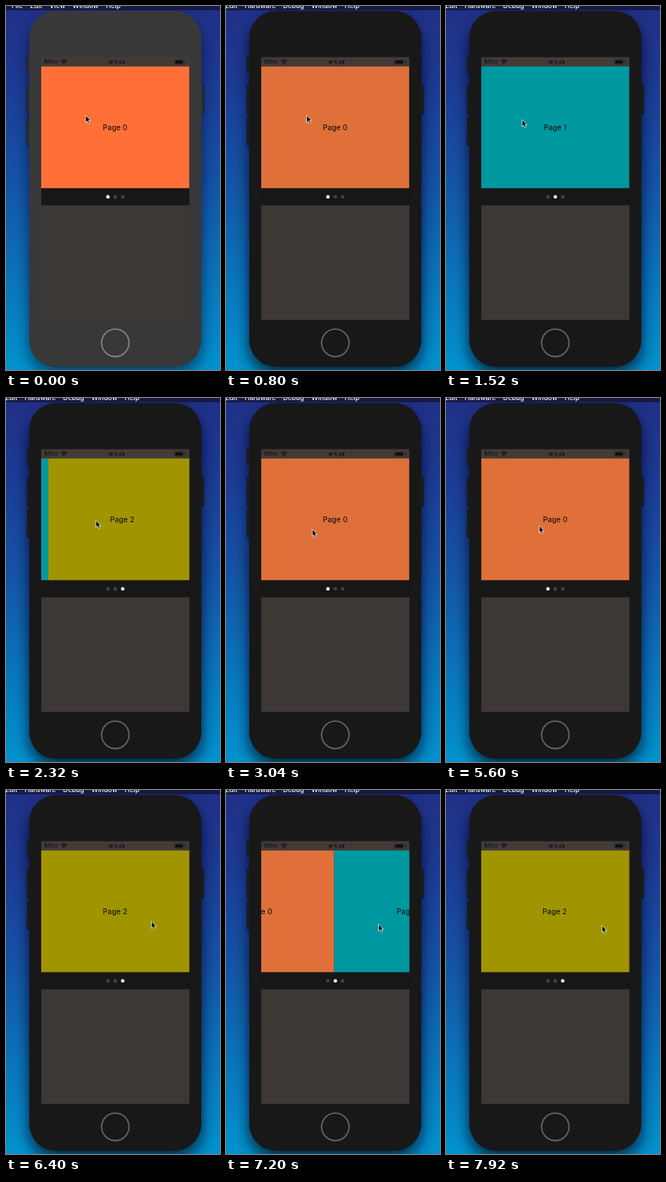
Write an HTML page that moves like this. It is 304 px wide and 516 px high and loops after 8 s.

```html
<!DOCTYPE html>
<html lang="en">
<head>
<meta charset="utf-8">
<title>Paging demo</title>
<style>
  html, body { margin: 0; width: 100%; height: 100%; overflow: hidden; background: #1f3488; }
  svg { display: block; width: 304px; height: 516px; }
  text { font-family: Inter, Roboto, sans-serif; }
  #menu { font-size: 9.5px; font-weight: 500; word-spacing: 7.8px; fill: #fff; }
  .label { font-size: 10.6px; text-anchor: middle; fill: #080808; }
  .status text { font: 8px "Noto Sans Devanagari", "Noto Sans", sans-serif; fill: #111; }
  .status .time { font-size: 7.5px; font-weight: 700; text-anchor: middle; }
  #phone { --body: #181818; --ring: #626262; --orange: #df7039; --key: #1c1d21; --dot: #e6e6e6; --shade: .8; }
  #phone.idle { --body: #383838; --ring: #808084; --orange: #ff7038; --key: #2b2d33; --dot: #fff; --shade: .6; }
  .body { fill: var(--body); }
  .shade { fill: #030a20; opacity: var(--shade); }
  .key { fill: var(--key); stroke: #10131c; stroke-width: .6; }
  .ring { fill: none; stroke: var(--ring); stroke-width: 2; }
</style>
</head>
<body>
<svg viewBox="0 0 304 516" xmlns="http://www.w3.org/2000/svg">
  <defs>
    <linearGradient id="sky" x1="0" y1="0" x2="0" y2="1">
      <stop offset="0" stop-color="#202f86"/>
      <stop offset=".22" stop-color="#1c3b94"/>
      <stop offset=".5" stop-color="#1455a8"/>
      <stop offset=".8" stop-color="#087bbe"/>
      <stop offset="1" stop-color="#0292cd"/>
    </linearGradient>
    <filter id="blur" x="-20%" y="-20%" width="140%" height="140%">
      <feGaussianBlur stdDeviation="10"/>
    </filter>
    <clipPath id="view"><rect x="50" y="85.5" width="210.5" height="173"/></clipPath>
  </defs>

  <rect width="304" height="516" fill="url(#sky)"/>

  <g id="phone">
    <rect class="shade" x="33" y="20" width="244.5" height="502" rx="38" filter="url(#blur)"/>
    <rect width="304" height="6" fill="#151943"/>
    <text id="menu" y="2.5"></text>

    <rect class="key" x="29.8" y="71" width="6" height="24" rx="1.5"/>
    <rect class="key" x="29.8" y="112" width="6" height="41" rx="1.5"/>
    <rect class="key" x="29.8" y="157" width="6" height="41" rx="1.5"/>
    <rect class="key" x="275" y="112" width="6" height="41" rx="1.5"/>
    <rect class="body" x="33" y="7" width="244.5" height="504.5" rx="38"/>
    <circle class="ring" cx="155.3" cy="477.5" r="19.5"/>

    <rect x="50" y="72.5" width="210.5" height="13.5" fill="#413b38"/>
    <rect x="50" y="258" width="210.5" height="25" fill="#181717"/>
    <rect x="50" y="282.5" width="210.5" height="162.5" fill="#3d3835"/>

    <g class="status">
      <text x="54" y="82">कैरियर</text>
      <text class="time" x="157" y="82">अ ९:०४</text>
      <path d="M78 78q4.300-3.400 8.600 0M79.700 80q2.600-2 5.200 0" fill="none" stroke="#111" stroke-width="1.5"/>
      <circle cx="82.3" cy="81.6" r="1.1" fill="#111"/>
      <rect x="239.5" y="76.3" width="15" height="6.2" rx="1.5" fill="none" stroke="#26211f" stroke-width=".7"/>
      <rect x="240.5" y="77.2" width="11" height="4.4" rx=".6" fill="#0c0c0c"/>
      <path d="M255.800 78v2.600" stroke="#26211f"/>
    </g>

    <g clip-path="url(#view)" id="pages"></g>
    <g id="dots"></g>
  </g>

  <path id="cursor" d="M0 0v10l2.200-2 1.600 3.600 1.900-.8-1.600-3.500h3z"
    fill="#050505" stroke="#fff" stroke-width=".8" stroke-linejoin="round"/>
</svg>

<script>
const LOOP = 8000, FOCUS = 480, WIDTH = 210.5;
const DRAG = 200, REACH = 80, RETURN = 130, GAP = 440, SETTLE = 55;
const COLORS = ['var(--orange)', '#0098a0', '#a09500'];
const START = { x: 113, y: 155 };

// Runs of evenly spaced swipes: where and when the last one is released
const RUNS = [
  { end: 1120, x: 108, y: 161, count: 1, step: 1 },
  { end: 2620, x: 122.5, y: 186, count: 2, step: 1 },
  { end: 3820, x: 148, y: 186, count: 1, step: 1 },
  { end: 5240, x: 135.5, y: 181, count: 2, step: 1 },
  { end: 5880, x: 206.5, y: 186, count: 1, step: -1 },
  { end: 7630, x: 221.5, y: 192, count: 3, step: -1 }
];

const $ = id => document.getElementById(id);
const clamp = u => Math.min(1, Math.max(0, u));
const ease = u => clamp(u) ** 2 * (3 - 2 * clamp(u));
const mix = (a, b, u) => a + (b - a) * u;
const mod = (n, m) => ((n % m) + m) % m;

const swipes = RUNS.flatMap((run, r) => {
  const from = RUNS[r - 1] || START;
  return Array.from({ length: run.count }, (_, i) => {
    const u = (i + 1) / run.count;
    const end = run.end - (run.count - 1 - i) * GAP;
    return { end, press: end - DRAG, step: run.step, x: mix(from.x, run.x, u), y: mix(from.y, run.y, u) };
  });
});

function cursorAt(t) {
  let { x, y } = START;
  for (const s of swipes) {
    const pressX = s.x + REACH * s.step;
    x = mix(x, pressX, ease((t - s.press + RETURN) / RETURN));
    const u = ease((t - s.press) / DRAG);
    x = mix(x, s.x, u);
    y = mix(y, s.y, u);
  }
  return [x, y];
}

// Each swipe follows the pointer, then glides to the next whole page.
function positionAt(t) {
  return swipes.reduce((pos, s) => {
    const drag = s.step * REACH / WIDTH * ease((t - s.press) / DRAG);
    const glide = t < s.end ? 0 : 1 - Math.exp((s.end - t) / SETTLE);
    return pos + mix(drag, s.step, glide);
  }, 0);
}

function add(parent, tag, attrs, text = '') {
  const node = document.createElementNS('http://www.w3.org/2000/svg', tag);
  for (const key in attrs) node.setAttribute(key, attrs[key]);
  node.textContent = text;
  return parent.appendChild(node);
}

const pages = COLORS.map((fill, i) => {
  const page = add($('pages'), 'g', {});
  add(page, 'rect', { x: 50, y: 85.5, width: WIDTH, height: 173, fill });
  add(page, 'text', { class: 'label', x: 155, y: 176 }, 'Page ' + i);
  return page;
});
const dots = COLORS.map((_, i) => add($('dots'), 'circle', { cx: 144.8 + i * 10.5, cy: 270.5, r: 2.5 }));

function draw(t) {
  const pos = positionAt(t), idle = t < FOCUS;
  $('cursor').setAttribute('transform', `translate(${cursorAt(t)})`);
  $('phone').setAttribute('class', idle ? 'idle' : '');
  $('menu').setAttribute('x', idle ? 8 : -1);
  $('menu').textContent = idle ? 'File Edit View Window Help' : 'Edit Hardware Debug Window Help';
  pages.forEach((page, i) => {
    const offset = mod(i - pos + 1.5, 3) - 1.5;
    page.setAttribute('transform', `translate(${offset * WIDTH} 0)`);
  });
  const current = mod(Math.round(pos), 3);
  dots.forEach((dot, i) => dot.setAttribute('fill', i === current ? 'var(--dot)' : '#434343'));
}

const begin = performance.now();
function tick() {
  draw((performance.now() - begin) % LOOP);
  requestAnimationFrame(tick);
}
tick();
</script>
</body>
</html>
```
